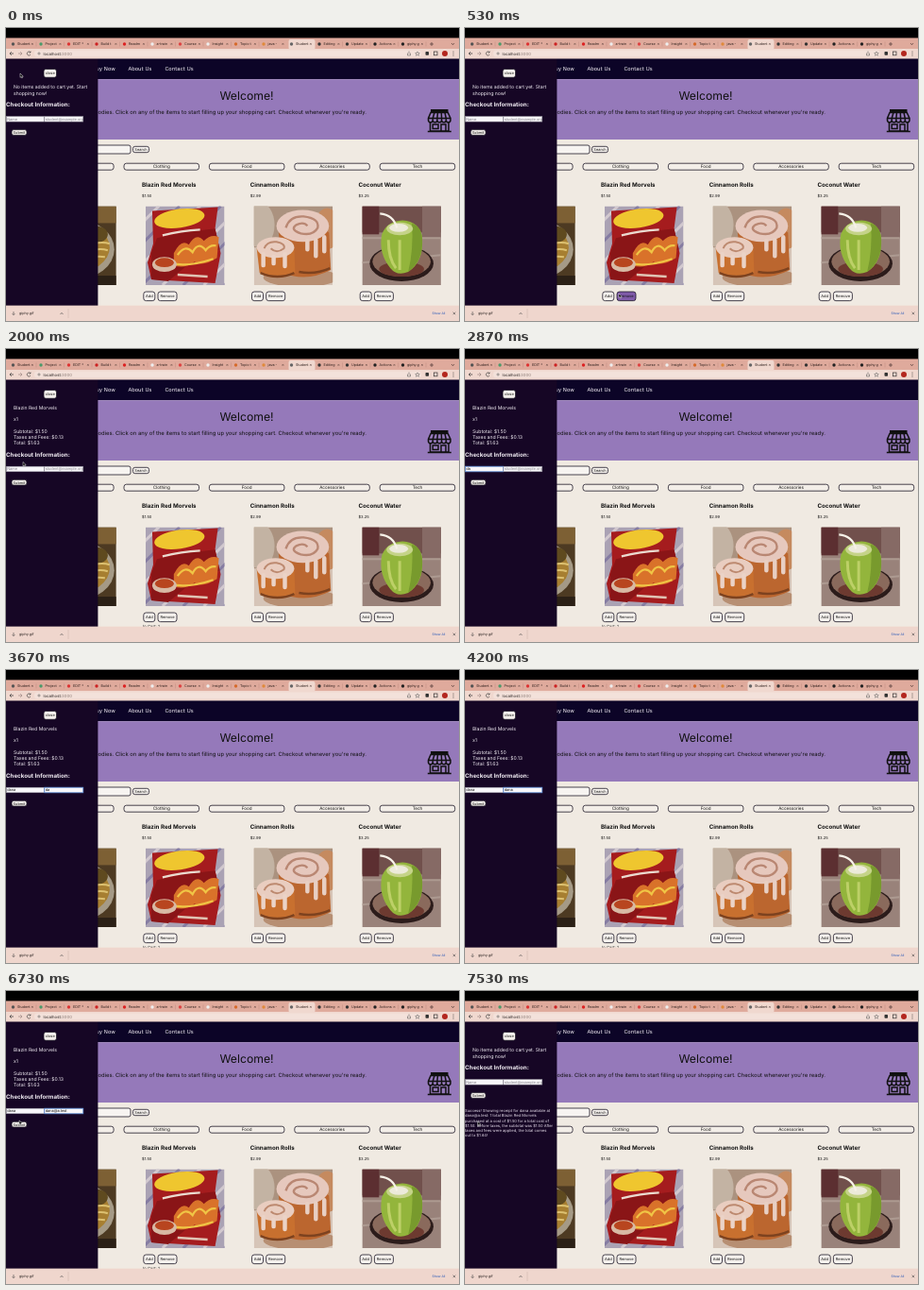
An HTML page that plays this animation: 480x310 px, repeating every 8 s.

```html
<!DOCTYPE html>
<html lang="en">
<head>
<meta charset="utf-8">
<title>Student Store</title>
<style>
  html, body { margin: 0; width: 100%; height: 100%; overflow: hidden; background: #000; }
  svg { display: block; width: 480px; height: 310px; }
  text { font-family: Inter, "Liberation Sans", sans-serif; text-rendering: geometricPrecision; white-space: pre; }
  .nav { font-family: "DejaVu Sans", sans-serif; }
</style>
</head>
<body>
<svg id="stage" viewBox="0 0 480 310"></svg>
<script>
const LOOP = 8000, FPS = 15;
const ITEM = 'Blazin Red Morvels', NAME = 'dana', MAIL = 'dana@a.test';
const INK = '#111', CREAM = '#f0eae2';

// Drawing helpers, each returning SVG markup
const rect = (x, y, w, h, fill, more = '') =>
  `<rect x="${x}" y="${y}" width="${w}" height="${h}" fill="${fill}" ${more}/>`;
const oval = (x, y, rx, ry, fill, more = '') =>
  `<ellipse cx="${x}" cy="${y}" rx="${rx}" ry="${ry}" fill="${fill}" ${more}/>`;
const shape = (d, fill) => `<path d="${d}" fill="${fill}"/>`;
const line = (d, color, width = .7, more = '') =>
  `<path d="${d}" fill="none" stroke="${color}" stroke-width="${width}" ${more}/>`;
const text = (x, y, s, size, fill = INK, more = '') =>
  `<text x="${x}" y="${y}" font-size="${size}" fill="${fill}" ${more}>${s}</text>`;
const mid = (x, y, s, size, fill) => text(x, y, s, size, fill, 'text-anchor="middle"');
const bold = (x, y, s, size, fill) => text(x, y, s, size, fill, 'font-weight="700"');
const button = (x, y, w, h, label, size, fill = '#f5f1ed', r = 2.2) =>
  rect(x, y, w, h, fill, `rx="${r}" stroke="#1c1726" stroke-width=".8"`) +
  mid(x + w / 2, y + h / 2 + size * .36, label, size);

function browser() {
  const tabs = ['Student', 'Project', 'EDIT *', 'Build t', 'Readm', 'a-train', 'Course', 'Insight',
    'Topic t', 'java -', 'Student', 'Editing', 'Update', 'Actions', 'giphy.g'];
  const icons = ['#555', '#4a9a6a', '#d33', '#c22', '#d22', '#eee', '#d44', '#eee',
    '#d66a2a', '#e08a3a', '#666', '#333', '#333', '#222', '#222'];
  let s = rect(0, 0, 480, 11, '#000') + rect(0, 10.5, 480, 12.5, '#dfaa9c') +
    rect(0, 22, 480, 10.5, '#f0d8cf') + rect(299.5, 12, 28, 11, '#f0d8cf', 'rx="2"');
  tabs.forEach((name, i) => {
    const x = 5 + i * 29.5;
    s += oval(x + 2.5, 17, 1.7, 1.7, icons[i]) + text(x + 7, 18.4, name, 3.7, '#2b1d1b') +
      line(`M${x + 22} 16l1.8 1.8m0-1.8l-1.8 1.8`, '#4a3430', .45);
    if (i !== 9 && i !== 10) s += line(`M${x + 27} 14.5v5`, '#b98679', .4);
  });
  s += line('M449 17h4m-2-2v4M472 16l1.5 1.8 1.5-1.8', '#3a2825', .6) +
    line('M8 27H4m1.8-1.8L4 27l1.8 1.8', '#333', .7) +
    line('M13 27h4m-1.8-1.8L17 27l-1.8 1.8', '#9b8681', .7) +
    line('M26 26a2 2 0 1 0 0 2m0-3.5V26h-1.5', '#333', .6) +
    rect(30, 23.5, 410, 7, '#f3e1da', 'rx="3.5"') +
    oval(35, 27, 1.1, 1.1, 'none', 'stroke="#444" stroke-width=".5"') +
    text(39.5, 28.6, 'localhost:<tspan fill="#8b7974">3000</tspan>', 4.3, '#2a2220') +
    line('M425.5 26.5v2.5h3v-2.5m-1.5 1v-3', '#444', .5) +
    line('M436 24.9l.7 1.5 1.6.1-1.2 1.1.4 1.6-1.5-.9-1.5.9.4-1.6-1.2-1.1 1.6-.1z', '#555', .5) +
    rect(444.5, 25, 3.5, 3.8, '#333', 'rx=".7"') +
    rect(453.5, 25, 3.5, 3.8, 'none', 'stroke="#333" stroke-width=".7"') +
    oval(465, 27, 3, 3, '#b3261e');
  for (const y of [25, 27, 29]) s += oval(474, y, .5, .5, '#333');
  return s;
}

function downloads() {
  return rect(0, 293.6, 480, 16.4, '#efd6cd') +
    line('M8 300v3.6m-1.4-1.4L8 303.6l1.4-1.4', '#444', .6) +
    text(14, 303.4, 'giphy.gif', 3.8, '#2a2220') +
    line('M57.5 303l1.5-1.7 1.5 1.7', '#444', .6) + line('M66 297v10', '#cbb0a8', .5) +
    text(451.5, 303.4, 'Show All', 3.4, '#2757b8') +
    line('M473.6 300.6l2.6 2.6m0-2.6l-2.6 2.6', '#444', .6);
}

function hero() {
  let s = rect(0, 32, 480, 262, CREAM) + rect(0, 32, 480, 22.2, '#0c0427') +
    rect(0, 54.2, 480, 63.8, '#9579ba');
  [[91.5, 'Buy Now'], [129.5, 'About Us'], [168.5, 'Contact Us']].forEach(([x, label]) =>
    s += text(x, 45, label, 5.5, '#f4f0f6', 'class="nav"'));
  s += mid(255, 76, 'Welcome!', 12.2) +
    text(382, 91, 'Find all your snacks and goodies. Click on any of the items to start filling up ' +
      'your shopping cart. Checkout whenever you\'re ready.', 5.88, INK, 'text-anchor="end"');
  // Shop front
  s += shape('M450 86h18.5v3.4h-18.5z', INK) +
    line('M450 89.5l-2.5 6v2a2.3 2.3 0 0 0 4.7 0a2.3 2.3 0 0 0 4.7 0a2.3 2.3 0 0 0 4.7 0a2.3 2.3 0 0 0 4.7 0' +
      'a2.3 2.3 0 0 0 4.7 0v-2l-2.8-6zM447.5 95.5h23.5M454 89.5l-1.8 6v2M457.5 89.5l-.6 6v2M461.3 89.5l.3 6v2M465 89.5l1.3 6v2', INK, 1.5) +
    line('M449.5 100v9h19.5v-9M452.2 102h5.8v4.5h-5.8zM461 109v-7h5v7M446.8 109.4h25', INK, 1.5);
  return s;
}

const photos = [
  rect(0, 0, 84, 84, '#4d3a22') + rect(0, 0, 84, 18, '#7d6034') + oval(40, 46, 42, 32, '#a59a86') +
    oval(39, 44, 38, 27, '#a77f31') + oval(62, 30, 13, 9, '#5f4a1f') +
    line('M50 44q16-8 27-4M48 51q16-8 27-4M46 58q14-6 26-4', '#dcc070', 2) + rect(60, 74, 24, 10, '#2b2016'),

  rect(0, 0, 84, 84, '#aaa2b4') +
    [0, 1, 2, 3, 4, 5, 6, 7].map(i => line(`M${i * 22 - 70} 84l84-84`, i % 2 ? '#857ca2' : '#d2c9cf', 3)).join('') +
    shape('M7 5L77 1 74 24 80 50 74 82 6 78 2 60 8 40z', '#a51c1e') +
    shape('M6 50L12 34 40 28 74 24 79 46 50 58 24 80 6 78z', '#8a1517') +
    oval(36, 13, 27, 10, '#efc62f', 'transform="rotate(-8 36 13)"') +
    line('M18 31q20-5 40-6', '#eadbd0', 2.2) +
    shape('M30 50q8-16 16-9q8-14 16-4q8-8 16-4l-2 22q-16 10-24 4q-10 8-22 4z', '#d9722a') +
    line('M34 52q8-12 16-3q6-12 14-2q4-6 11-5M26 60q16 6 46-4', '#f0c545', 2.2) +
    oval(20, 62, 13, 8, '#d8b9a4') + oval(20, 60, 10, 5, '#b8451f') +
    line('M34 73l32 2', '#e0c4b4', 2.5),

  rect(0, 0, 84, 84, '#d6c5b8') + rect(0, 0, 84, 44, '#ab927f') + oval(6, 20, 16, 24, '#c3b3a3') +
    oval(78, 24, 14, 22, '#c58a5f') + oval(50, 76, 40, 10, '#b78f73') +
    shape('M26 24q28-16 54 4l2 40q-28 14-52 2z', '#bb662f') + oval(52, 21, 28, 17, '#e6c8bd') +
    line('M34 23q4-13 19-12q17 2 15 12q-5 9-18 6q-12-4-5-9q8-4 12 1', '#b98773', 2.4) +
    line('M66 36v17M75 33v15M57 37v9', '#e8cfc3', 4.5, 'stroke-linecap="round"') +
    shape('M3 45q18-14 40 0l1 26q-20 10-38 0z', '#c8702f') + oval(23, 44, 20, 11, '#e9cdc0') +
    line('M11 45q3-8 13-7q10 2 8 7q-8 6-14 0', '#bd8a70', 2) +
    line('M10 51v12M21 54v7M33 51v13', '#ebd3c7', 4.5, 'stroke-linecap="round"') +
    line('M7 71q18 8 36 0M48 70q18 3 33-4', '#7d421f', 2.5),

  rect(0, 0, 84, 84, '#99827a') + rect(0, 0, 84, 28, '#71504c') + rect(0, 0, 18, 30, '#5c2f31') +
    rect(64, 0, 20, 34, '#866a65') + line('M0 34h84M0 60l84-8', '#ad9a91', 2) +
    oval(42, 61, 34, 19, '#2c1c1b') + oval(42, 59, 31, 16, '#8a6a5c') + oval(42, 67, 24, 8, '#6d3a30') +
    shape('M21 30q5-14 22-15q18 1 21 18q2 26-15 37q-12 5-19-4q-13-16-9-36z', '#93b53c') +
    shape('M53 18q11 4 11 18q1 22-15 34q6-24 4-52z', '#789a2d') +
    line('M28 36q0 20 8 30M40 36v32', '#bdd067', 3) +
    oval(40, 24, 14, 7, '#c5d389') + oval(39, 23, 10, 4.5, '#eceadb') +
    line('M19 8q14 1 18 15', '#f6f2e8', 2.2)
];

function shop({ t, inCart }) {
  const hoverAdd = t >= 730 && t < 1660, hoverRemove = t >= 450 && t < 730;
  let out = rect(40, 124, 92, 9, '#f7f4f1', 'rx="2" stroke="#1c1726" stroke-width=".8"') +
    button(134.5, 125.3, 17, 6.4, 'Search', 4);
  ['All', 'Clothing', 'Food', 'Accessories', 'Tech'].forEach((label, i) =>
    out += button(34.6 + i * 90.4, 143.2, 79.5, 7, label, 4.6, '#f3eee8', 2.6));
  [['Noodles', '4.50'], [ITEM, '1.50'], ['Cinnamon Rolls', '2.99'], ['Coconut Water', '3.25']].forEach(([name, price], i) => {
    const x = 29.3 + i * 114.7, hot = i === 1;
    out += bold(x, 168, name, 6.2) + text(x, 179, '$' + price, 4.1) +
      `<svg x="${x + 4}" y="188.5" width="83.5" height="83.5" viewBox="0 0 84 84">${photos[i]}</svg>` +
      button(x + 1.8, 279, 12, 9.6, 'Add', 4, hot && hoverAdd ? '#7f5aa8' : undefined, 2.6) +
      button(x + 17, 279, 20, 9.6, 'Remove', 4, hot && hoverRemove ? '#7f5aa8' : undefined, 2.6);
    if (hot && inCart) out += text(x + 1, 295.4, 'In Cart: 1', 4.3);
  });
  return out;
}

function field(x, y, w, value, hint, focus) {
  return rect(x + .3, y, w, 5.6, '#f7f6f9', `stroke="${focus ? '#5a8cd8' : '#8b8794'}" stroke-width="${focus ? .8 : .5}"`) +
    text(x + 1.2, y + 4.2, value || hint, 3.9, value ? INK : '#85828a');
}

function sidebar({ t, inCart, name, mail, focus }) {
  const white = '#f5f1f7', dy = inCart ? 30.7 : 0;
  const rows = inCart
    ? [[64, ITEM], [76, 'x1'], [88.5, 'Subtotal: $1.50'], [95, 'Taxes and Fees: $0.13'], [101.3, 'Total: $1.63']]
    : [[63.8, 'No items added to cart yet. Start'], [70.6, 'shopping now!']];
  let s = rect(0, 32, 97.4, 262, '#160625') + button(40, 43.5, 13.5, 8.8, 'close', 3.9);
  rows.forEach(([y, row]) => s += text(8, y, row, 5.1, white));
  s += bold(0, 83.4 + dy, 'Checkout Information:', 6.2, white) +
    field(0, 93.5 + dy, 40.3, name, 'Name', focus === 1) +
    field(40.5, 93.5 + dy, 41, mail, 'student@example.org', focus === 2) +
    button(6, 107.6 + dy, 16, 5.8, 'Submit', 3.9);
  if (t >= 7460) [
    `Success! Showing receipt for ${NAME} available at`,
    `${MAIL}: 1 total ${ITEM}`,
    'purchased at a cost of $1.50 for a total cost of',
    '$1.50. Before taxes, the subtotal was $1.50 After',
    'taxes and fees were applied, the total comes',
    'out to $1.64!'
  ].forEach((row, i) => s += text(0, 128 + i * 5.25, row, 4.1, '#e6deeb'));
  return s;
}

// Pointer stops: time, x, y
const stops = [[0, 15, 48], [67, 15, 48], [470, 163, 281], [600, 163, 281], [800, 151, 283], [1580, 151, 283],
  [2000, 18, 119.5], [2400, 18, 119.5], [2600, 19, 126], [6460, 19, 127], [6800, 13.5, 138], [LOOP, 13.5, 138]];

function pointer(t) {
  if (t >= 2860 && t < 6460) return ''; // hidden while typing
  const i = stops.findIndex(p => p[0] > t), [t0, x0, y0] = stops[i - 1], [t1, x1, y1] = stops[i];
  const u = (t - t0) / (t1 - t0), e = u * u * (3 - 2 * u);
  return `<path d="M0 0v4.4l1.1-.9.7 1.5.7-.3-.7-1.5h1.5z" fill="#000" stroke="#fff" stroke-width=".45"
    transform="translate(${x0 + (x1 - x0) * e} ${y0 + (y1 - y0) * e})"/>`;
}

const typed = (s, times, t) => s.slice(0, times.filter(k => t >= k).length);
const nameKeys = [2790, 2860, 2990, 3190];
const mailKeys = [3590, 3660, 3860, 3990, 5130, 5460, 5720, 5860, 5930, 5990, 6060];

function scene(t) {
  const inCart = t >= 930 && t < 6990;
  const state = {
    t, inCart,
    name: inCart ? typed(NAME, nameKeys, t) : '',
    mail: inCart ? typed(MAIL, mailKeys, t) : '',
    focus: t < 2660 || t >= 6860 ? 0 : t < 3390 ? 1 : 2
  };
  return hero() + shop(state) + sidebar(state) + browser() + downloads() + pointer(t);
}

const stage = document.getElementById('stage');
let last = -1;
function tick() {
  const step = Math.floor((performance.now() % LOOP + 5) * FPS / 1000) % (LOOP * FPS / 1000);
  if (step !== last) stage.innerHTML = scene(step * 1000 / FPS);
  last = step;
  requestAnimationFrame(tick);
}
tick();
</script>
</body>
</html>
```
